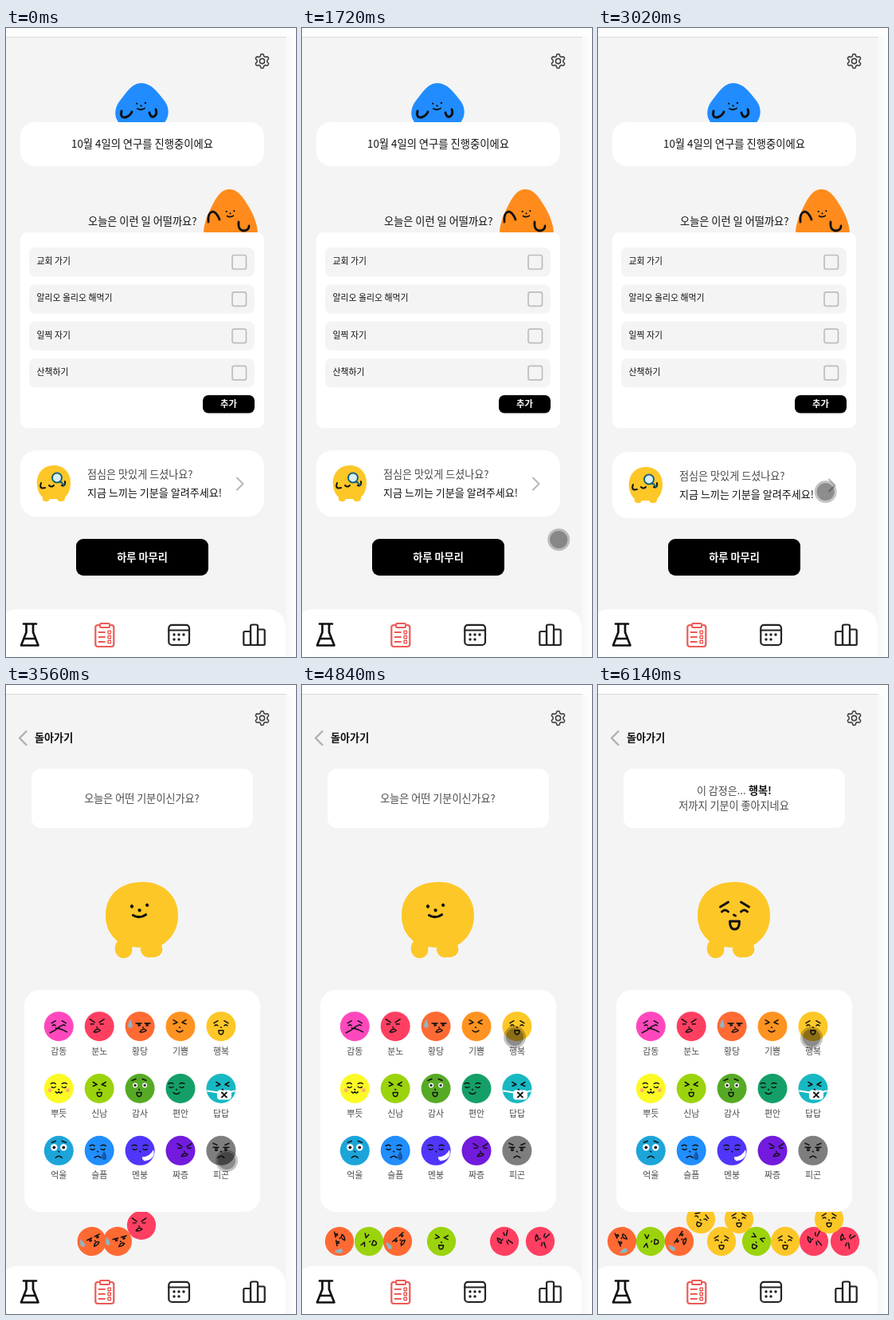
Write an HTML page with a canvas that moves like this. It is 364 px wide and 788 px high and loops after 6.16 s.

```html
<!DOCTYPE html>
<html lang="ko">
<head>
<meta charset="utf-8">
<title>오늘의 기분</title>
<style>
html, body { margin: 0; width: 100%; height: 100%; overflow: hidden; background: #fdfdfd; }
canvas { display: block; width: 364px; height: 788px; }
</style>
</head>
<body>
<canvas id="stage"></canvas>
<script>
const W = 364, H = 788, LOOP = 6160, SWITCH = 3220, HAPPY = 4900;
const FONT = '"Noto Sans CJK KR", "Noto Sans KR", "Noto Sans CJK", sans-serif';
const BG = '#f4f4f4', INK = '#111', SOFT = '#4a4a4a', YELLOW = '#fdc727';
const canvas = document.getElementById('stage');
const dpr = window.devicePixelRatio || 1;
canvas.width = W * dpr;
canvas.height = H * dpr;
const c = canvas.getContext('2d');
c.lineCap = c.lineJoin = 'round';

const clamp = v => Math.max(0, Math.min(1, v));
const lerp = (a, b, k) => a + (b - a) * k;
const smooth = v => { const k = clamp(v); return k * k * (3 - 2 * k); };
const pulse = (t, a, b, ramp) => clamp(Math.min((t - a) / ramp, (b - t) / ramp));

function box(x, y, x2, y2, r, color) {
  c.beginPath();
  c.roundRect(x, y, x2 - x, y2 - y, r);
  c.fillStyle = color;
  c.fill();
}
function frameBox(x, y, x2, y2, r, color, width) {
  c.beginPath();
  c.roundRect(x, y, x2 - x, y2 - y, r);
  c.strokeStyle = color;
  c.lineWidth = width;
  c.stroke();
}
function disc(x, y, r, color) {
  c.beginPath();
  c.arc(x, y, r, 0, 7);
  c.fillStyle = color;
  c.fill();
}
function fill(d, color) {
  c.fillStyle = color;
  c.fill(new Path2D(d));
}
function line(d, color = INK, width = 1.5) {
  c.strokeStyle = color;
  c.lineWidth = width;
  c.stroke(new Path2D(d));
}
// y is the optical middle of the glyphs
function text(s, x, y, size = 13.1, weight = 400, color = INK, align = 'left') {
  c.font = `${weight} ${size}px ${FONT}`;
  c.textAlign = align;
  c.fillStyle = color;
  c.fillText(s, x, y + size * 0.38);
}
function at(x, y, scale, turn, draw) {
  c.save();
  c.translate(x, y);
  c.rotate(turn);
  c.scale(scale, scale);
  draw();
  c.restore();
}
function mirrored(draw) {
  draw();
  c.scale(-1, 1);
  draw();
  c.scale(-1, 1);
}

// left eye with its brow; the right one is mirrored
const EYES = {
  soft: 'M-9-4l5-3M-8-1q2-2 4 0',
  angry: 'M-9-9l6 4M-8-3h4',
  half: 'M-9-4h7M-6-3v2h2v-2',
  squint: 'M-8-8l5 3-5 2',
  calm: 'M-10-6q3-2 6 0M-9-2q2 2 5 0',
  wide: 'M-9-10l5-2',
  tired: 'M-10-9l5 2M-10-4h7M-7-3v3h2v-3'
};
const MOUTHS = {
  smile: 'M-4 5q4 4 8 0',
  open: 'M-3 5h6q0 5-3 5q-3 0-3-5',
  frown: 'M-4 9q4-4 8 0',
  shout: 'M-4 7q4-6 8-2q-3 3-8 2',
  wave: 'M-4 4q2 3 4 0q2 3 4 0',
  arms: 'M-11 8Q-4 5 3-1M-4 2Q4 3 10 7',
  none: ''
};
const cheeks = () => mirrored(() => disc(-11, 2, 2.6, '#ffb36b'));
const sweat = () => fill('M-12-9Q-18 1-12 2Q-7 1-12-9', '#8bb6c4');
const tear = () => fill('M6 0Q0 11 6 12Q12 11 6 0', '#1559ac');
const grin = () => fill('M3 8Q12 8 17-1Q20 11 6 13Q2 11 3 8', '#fff');
const eyeballs = (r, pupil) => mirrored(() => {
  disc(-6, -4, r, '#fff');
  disc(-6, -4, pupil, INK);
});
function mask() {
  line('M-17 3L-4 5M17 3L10 5', '#fff', 2);
  box(-5, 2, 13, 14, 4, '#fff');
  line('M1 5l6 6M7 5l-6 6', INK, 1.8);
}
// name, colour, eyes, mouth, sideways shift of the face, detail
const moods = [
  ['감동', '#ff48bd', 'soft', 'arms', 0],
  ['분노', '#ff3f62', 'angry', 'shout', -3],
  ['황당', '#ff6a33', 'half', 'shout', 4, sweat],
  ['기쁨', '#ff9321', 'squint', 'smile', -1],
  ['행복', YELLOW, 'soft', 'open', 0],
  ['뿌듯', '#fcfa25', 'calm', 'wave', 0, cheeks],
  ['신남', '#9bd30d', 'squint', 'open', 0],
  ['감사', '#57aa25', 'wide', 'open', -1, () => eyeballs(3, 1.6)],
  ['편안', '#159f68', 'calm', 'smile', -5],
  ['답답', '#17b8c2', 'squint', 'none', 2, mask],
  ['억울', '#1ca5d9', 'wide', 'frown', 0, () => eyeballs(4.2, 1.9)],
  ['슬픔', '#218eff', 'calm', 'frown', -2, tear],
  ['멘붕', '#5036fa', 'calm', 'none', 0, grin],
  ['짜증', '#721bdd', 'angry', 'shout', 5],
  ['피곤', '#7e7e7e', 'tired', 'frown', 0]
];
const RED = 1, ORANGE = 2, JOY = 4, GREEN = 6;

function face(id) {
  const [, , eyes, mouth, dx, detail] = moods[id];
  if (detail) detail();
  at(dx, 0, 1, 0, () => {
    mirrored(() => line(EYES[eyes]));
    line('M-.5 1l1 .5' + MOUTHS[mouth]);
  });
}
function emoji(id, x, y, scale = 1, turn = 0) {
  at(x, y, scale, turn, () => {
    disc(0, 0, 18.5, moods[id][1]);
    face(id);
  });
}

// Balls leave the character, land, then slide to rest and turn as they go.
const FALL = 200, HOME_X = 170, HOME_Y = 288, FLOOR = 697, STACK = 669;
const dropped = [[ORANGE, 47, -17], [ORANGE, 120, -18], [RED, 299, 11], [RED, 254, 17], [GREEN, 84, -18], [GREEN, 175, 24]]
  .map(([id, rest, push], i) => ({ id, rest, push, born: 3216 + i * 75, land: HOME_X, hop: 0, y: FLOOR }));
const joy = [[4910, 155, 40, 155, FLOOR], [5416, 105, 144, 129, STACK], [5406, 235, 80, 235, FLOOR], [5600, 177, 40, 177, STACK], [5670, 290, 40, 290, STACK]]
  .map(([born, land, hop, rest, y]) => ({ id: JOY, born, land, hop, rest, y, push: 0 }));
const balls = [...dropped, ...joy];

function drawBall(b, t) {
  if (t < b.born) return;
  const k = clamp((t - b.born) / FALL);
  let x = lerp(HOME_X, b.land, 1 - (1 - k) ** 2);
  const y = lerp(HOME_Y, b.y, k * k) - b.hop * 4 * k * (1 - k);
  const way = b.rest - b.land;
  const slid = way ? clamp((t - b.born - FALL) * 0.43 / Math.abs(way)) : 1;
  x += way * slid;
  // the push spreads outward from the middle of the row
  const pushed = b.push * smooth((t - 5050 - Math.abs(b.rest - 175) * 4) / 560);
  emoji(b.id, x + pushed, y, .98, (way * slid * slid + pushed) / 70);
}

const path = [
  [840, -14, 600], [980, 84, 643], [1240, 100, 651], [1380, 100, 651], [1800, 345, 640],
  [2440, 309, 619], [2660, 309, 619], [3060, 285, 580], [3560, 277, 596], [4700, 267, 441], [LOOP, 268, 442]
];
function pointer(t) {
  const i = path.findIndex(p => p[0] > t);
  if (i < 1) return;
  const [a, b] = [path[i - 1], path[i]];
  const k = smooth((t - a[0]) / (b[0] - a[0]));
  const x = lerp(a[1], b[1], k), y = lerp(a[2], b[2], k);
  disc(x, y, 14, 'rgba(0,0,0,.23)');
  disc(x, y, 11, 'rgba(0,0,0,.28)');
}

function gear() {
  c.beginPath();
  for (let i = 0; i < 72; i++) {
    const a = i * Math.PI / 36;
    const r = 7.6 + 1.3 * Math.tanh(2.2 * Math.cos(6 * a + Math.PI));
    c.lineTo(321.5 + r * Math.cos(a), 41.5 + r * Math.sin(a));
  }
  c.closePath();
  c.strokeStyle = '#444';
  c.lineWidth = 1.6;
  c.stroke();
  c.beginPath();
  c.arc(321.5, 41.5, 3.1, 0, 7);
  c.stroke();
}

function backdrop() {
  c.fillStyle = '#fdfdfd';
  c.fillRect(0, 0, W, H);
  const g = c.createLinearGradient(351, 0, 364, 0);
  g.addColorStop(0, '#f8f8f8');
  g.addColorStop(1, '#fefefe');
  c.fillStyle = g;
  c.fillRect(351, 12, 13, H);
  c.fillStyle = BG;
  c.fillRect(0, 12, 351.5, H);
  c.fillStyle = '#dadada';
  c.fillRect(0, 11, 352, 1);
  gear();
}

function nav() {
  box(-8, 728, 351, 820, 22, '#fff');
  line('M22 746.5H38M25.5 747V757L19 773.5H40.5L34 757V747M23 765H36.5', INK, 2.7);
  const red = '#ee5a55';
  frameBox(112.3, 748, 135.3, 775, 3, red, 2.2);
  box(117, 745, 131, 752, 1, '#fff');
  frameBox(118, 746, 130, 751, 1, red, 2);
  for (let i = 0; i < 3; i++) {
    const y = 757 + i * 6;
    line(`M116.5 ${y}H124`, red, 1.8);
    frameBox(128, y - 1.7, 131.5, y + 1.7, .5, red, 1.4);
  }
  frameBox(204.3, 747.8, 230, 773, 4, '#222', 2.2);
  line('M204.3 754.5H230', '#222', 2.2);
  for (let i = 0; i < 5; i++) disc(211 + (i % 3) * 6, 760 + (i > 2 ? 6 : 0), 1.7, '#222');
  frameBox(298.3, 756, 307, 773, 1.5, '#222', 2.2);
  frameBox(307, 747.5, 316, 773, 2, '#222', 2.2);
  frameBox(316, 753.5, 324.7, 773, 1.5, '#222', 2.2);
}

function seeker() {
  fill('M59 548C72 547 81 557 81 569C81 580 77 585 74 588C75 594 66 595 64 590H55C54 595 44 594 46 588C34 577 36 549 59 548', YELLOW);
  line('M44 570Q41 578 49 576M70 573Q75 575 74 568M54 573Q57 576 60 573', INK, 2);
  disc(64, 563.5, 6, '#d9f0f4');
  line('M68.5 568L73 573M58 563.5a6 6 0 1 0 12 0a6 6 0 1 0-12 0', '#1c6478', 2);
}

// two eyes, a nose and a smile
function plainFace(x, y, size) {
  at(x, y, size, 0, () => line('M-6-2l.1.1M6-3l.1.1M0 1l.1.1', INK, 2.6));
  at(x, y, size, 0, () => line('M-5 5Q0 8 5 4.5', INK, 2));
}

function home(t) {
  fill('M170 69C182 69 190 80 198 90C206 100 206 112 196 122H146C136 116 134 103 143 91C152 80 158 69 170 69Z', '#218cff');
  plainFace(169.5, 96.5, .9);
  line('M145 104Q143 113 150 112Q156 110 158 105M180 106Q182 114 187 110Q190 107 188 102', INK, 3);
  box(18, 118, 324, 173, 18, '#fff');
  text('10월 4일의 연구를 진행중이에요', 171, 145, 13.3, 500, INK, 'center');

  fill('M280 202C292 202 298 213 306 226C312 237 316 248 316 258H248C248 246 252 236 258 224C264 212 270 202 280 202Z', '#ff8b1c');
  plainFace(281.5, 231.5, .8);
  line('M254 243Q253 232 259 230Q264 230 268 240M292 243Q291 254 299 254Q305 253 305 248', INK, 2.8);
  text('오늘은 이런 일 어떨까요?', 103, 242, 13.2, 500);

  box(18, 256, 324, 501, 9, '#fff');
  ['교회 가기', '알리오 올리오 해먹기', '일찍 자기', '산책하기'].forEach((s, i) => {
    const y = 275 + i * 46.3;
    box(29, y, 312, y + 36.5, 8, BG);
    text(s, 38.5, y + 17, 10.9, 500);
    frameBox(284, y + 9.5, 301.5, y + 27, 2.5, '#bdbdbd', 1.7);
  });
  box(247, 460, 312, 482.5, 7, '#000');
  text('추가', 279.5, 471, 11.3, 700, '#fff', 'center');

  const drop = 2 * Math.max(pulse(t, 860, 1230, 50), pulse(t, 2900, 3300, 50));
  at(0, drop, 1, 0, () => {
    box(18, 529, 324, 612, 20, '#fff');
    seeker();
    text('점심은 맛있게 드셨나요?', 102, 559, 13.1, 300, SOFT);
    text('지금 느끼는 기분을 알려주세요!', 102, 582, 13.05, 500);
    line('M290 563.5L297.5 571L290 578.5', '#b5b5b5', 2);
  });
  box(88, 640, 254, 686, 9, '#000');
  text('하루 마무리', 171, 663, 13.2, 700, '#fff', 'center');
}

function buddy(happy) {
  fill('M168 247C196 245 216 264 216 288C216 307 207 319 195 326C200 337 190 342 182 341C173 343 168 335 169 329L158 328C160 338 153 343 146 342C137 341 134 328 140 321C130 313 125 302 125 289C125 264 142 248 168 247Z', YELLOW);
  if (happy) at(171.5, 286, 2, 0, () => face(JOY));
  else plainFace(167.5, 280.5, 1.6);
}

function mood(t) {
  const press = Math.max(...[4870, 5430, 5590].map(s => pulse(t, s, s + 140, 40)));
  const happy = t >= HAPPY;
  line('M25.5 58L17 66.5L25.5 75', '#b0b0b0', 2.4);
  text('돌아가기', 36, 66, 13.1, 600);
  box(32, 105, 310, 179, 12, '#fff');
  if (happy) {
    text('이 감정은...', 124, 132, 13, 400, SOFT);
    text('행복!', 189, 132, 13.1, 700);
    text('저까지 기분이 좋아지네요', 170.5, 151, 13.1, 400, SOFT, 'center');
  } else {
    text('오늘은 어떤 기분이신가요?', 170.5, 142, 13.1, 400, SOFT, 'center');
  }
  balls.forEach(b => drawBall(b, t));
  at(0, happy ? press : 0, 1, 0, () => buddy(happy));
  box(23, 382, 319, 660, 20, '#fff');
  moods.forEach(([name], i) => {
    const x = 66.3 + (i % 5) * 50.9, y = 427.7 + Math.floor(i / 5) * 77.8;
    const p = i === JOY ? press : 0;
    emoji(i, x, y - 3 * p, 1 + .22 * p);
    text(name, x, y + 31 + 4 * p, 10.9 + 2.2 * p, 400, SOFT, 'center');
  });
}

const start = performance.now();
function frame() {
  const t = (performance.now() - start) % LOOP;
  c.setTransform(dpr, 0, 0, dpr, 0, 0);
  backdrop();
  (t < SWITCH ? home : mood)(t);
  nav();
  pointer(t);
  requestAnimationFrame(frame);
}
frame();
</script>
</body>
</html>
```
